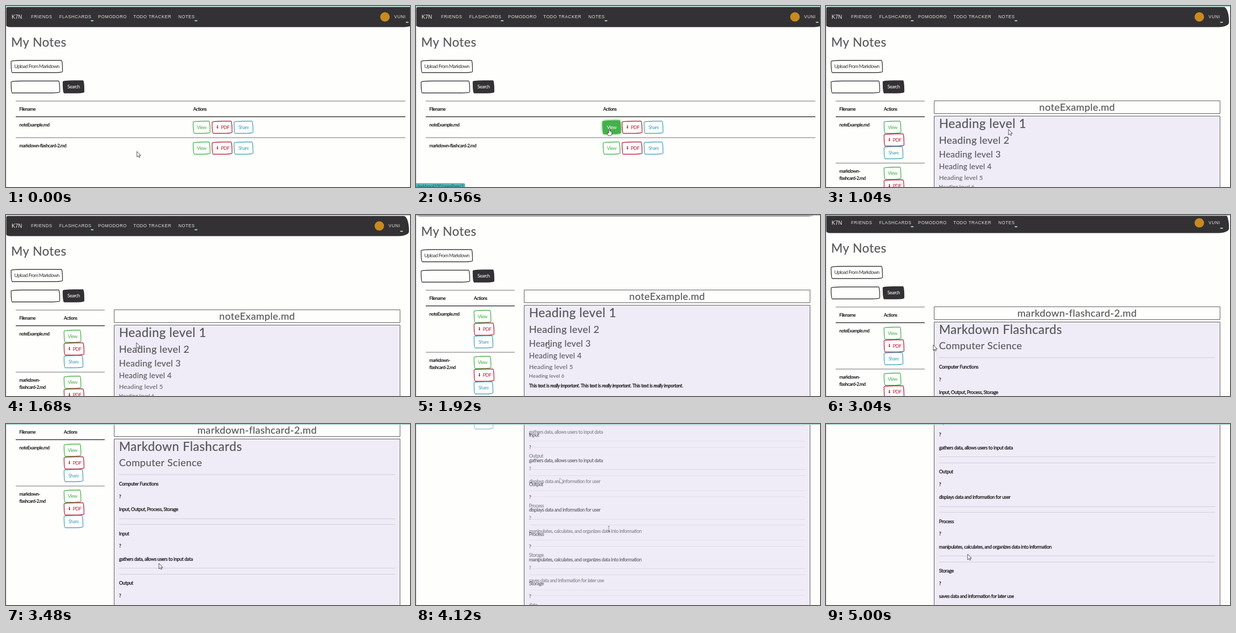
Write an HTML page with a canvas that moves like this. It is 790 px wide and 356 px high and loops after 5520 ms.

```html
<!DOCTYPE html>
<html lang="en">
<head>
<meta charset="utf-8">
<title>My Notes</title>
<style>
  html, body { margin: 0; width: 100%; height: 100%; overflow: hidden; background: #fefefd; }
  canvas { display: block; }
</style>
</head>
<body>
<canvas id="stage" width="790" height="356"></canvas>
<script>
const W = 790, H = 356, LOOP = 5520, STEP = 40, LAST = 5000;
const INK = '#1a1a1a', DARK = '#333133', GREEN = '#45b04b', RED = '#b5203c', BLUE = '#45a3b8', TEAL = '#a9d3d1';
const stage = document.getElementById('stage').getContext('2d');
const layer = document.createElement('canvas');
layer.width = W;
layer.height = H;
const ctx = layer.getContext('2d');

// Keys are [time, ...values]; two keys at one time make a jump.
const SCROLL = [[0, 0], [1760, 0], [2120, 94], [2700, 94], [2700, 0], [3000, 0], [3360, 187],
  [3560, 187], [4120, 381], [4160, 437], [4440, 455], [4960, 406]];
const POINTER = [[0, 256, 286], [440, 378, 241], [840, 378, 241], [1600, 255, 251], [2080, 255, 251],
  [2440, 135, 240], [2720, 135, 240], [3400, 299, 274], [3560, 299, 274], [4120, 377, 206],
  [4160, 281, 106], [4960, 277, 256]];

const CARDS = [
  ['Computer Functions', 'Input, Output, Process, Storage'],
  ['Input', 'gathers data, allows users to input data'],
  ['Output', 'displays data and information for user'],
  ['Process', 'manipulates, calculates, and organizes data into information'],
  ['Storage', 'saves data and information for later use'],
  ['data', '']
];

function track(keys, t) {
  const i = keys.findLastIndex(k => k[0] <= t);
  const a = keys[i], b = keys[i + 1];
  if (!b) return a.slice(1);
  const p = (t - a[0]) / (b[0] - a[0]), e = p * p * (3 - 2 * p);
  return a.slice(1).map((v, n) => v + (b[n + 1] - v) * e);
}

function stateAt(t) {
  const [scroll] = track(SCROLL, t), [x, y] = track(POINTER, t);
  return { scroll, x, y, note: t < 840 ? 0 : t < 2700 ? 1 : 2, overText: t >= 4000 && t < 4160 };
}

// y is the middle of the capitals; weight thickens the strokes.
function text(s, x, y, { size = 9.5, color = INK, style = '', family = 'Lato', gap = -0.45, align = 'left', weight = 0 } = {}) {
  ctx.font = `${style} ${size}px ${family}, sans-serif`;
  ctx.letterSpacing = gap + 'px';
  ctx.textAlign = align;
  ctx.fillStyle = ctx.strokeStyle = color;
  ctx.fillText(s, x, y + size * 0.35);
  if (weight) {
    ctx.lineJoin = 'round';
    ctx.lineWidth = weight;
    ctx.strokeText(s, x, y + size * 0.35);
  }
  return ctx.measureText(s).width;
}

// Parts between asterisks are italic.
function rich(s, x, y) {
  s.split('*').forEach((part, i) => x += text(part, x, y, { style: i % 2 ? 'italic' : '', weight: 0.3 }));
}

function heading(s, x, y, size, align = 'left') {
  text(s, x, y, { size, align, gap: size * 0.02, color: size > 14 ? '#58585b' : '#626265', weight: size * 0.01 });
}

function line(x1, x2, y, color = DARK, width = 1) {
  ctx.fillStyle = color;
  ctx.fillRect(x1, y, x2 - x1, width);
}

function sketchBox(x, y, w, h, color, fill) {
  ctx.beginPath();
  ctx.roundRect(x, y, w, h, [{ x: 155, y: 15 }, { x: 15, y: 137 }, { x: 137, y: 15 }, { x: 15, y: 155 }]);
  if (fill) {
    ctx.fillStyle = fill;
    ctx.fill();
  }
  ctx.strokeStyle = color;
  ctx.lineWidth = 1.3;
  ctx.stroke();
}

function button(label, x, y, w, color, solid) {
  sketchBox(x, y, w, 24, color, solid && color);
  text(label, x + w / 2, y + 12, { color: solid ? '#fff' : color, align: 'center', gap: -0.65 });
}

function caret(x, y) {
  ctx.fillStyle = '#8fd0c2';
  ctx.beginPath();
  ctx.ellipse(x, y, 3, 1.2, 0, 0, 7);
  ctx.fill();
}

function navBar(wide) {
  const nav = (s, x) => text(s, x, 21.5, { size: 8.5, gap: 0.6, color: '#e4e4e4', family: 'Liberation Sans' });
  const end = wide ? 799 : 788;
  ctx.fillStyle = DARK;
  ctx.beginPath();
  ctx.roundRect(0, 2, end, 39.5, [{ x: 4, y: 4 }, { x: 10, y: 28 }, { x: 20, y: 9 }, { x: 8, y: 4 }]);
  ctx.fill();
  text('K7N', 11, 21.5, { size: 10.5, gap: 0, color: '#f4f4f4', family: 'Liberation Sans' });
  nav('FRIENDS', 49);
  nav('FLASHCARDS', 104);
  nav('POMODORO', 180);
  nav('TODO TRACKER', 249);
  nav('NOTES', 337);
  nav('VUNI', end - 40);
  caret(168.5, 29);
  caret(371.5, 29);
  caret(end - 14.5, 32);
  ctx.fillStyle = '#c88a20';
  ctx.beginPath();
  ctx.arc(end - 58, 21.5, 9.3, 0, 7);
  ctx.fill();
}

function viewBoxes(note) {
  return note ? [[113.5, 226.5], [113.5, 317]] : [[366, 226.5], [366, 267.5]];
}

function actions([x, y], stacked, hovered) {
  if (hovered) {
    ctx.save();
    ctx.shadowColor = '#4fc455';
    ctx.shadowBlur = 4;
    sketchBox(x - 1, y - 1, 35, 26, GREEN, GREEN);
    ctx.restore();
  }
  const place = i => stacked ? [x, y + 25 * i] : [x + [0, 37, 80][i], y];
  button('View', ...place(0), 33, GREEN, hovered);
  const [px, py] = place(1);
  button('', px, py, 39, RED);
  text('PDF', px + 17, py + 12, { color: RED });
  ctx.fillStyle = RED;
  ctx.fillRect(px + 9.7, py + 8, 1.6, 4);
  ctx.beginPath();
  ctx.moveTo(px + 8.5, py + 12);
  ctx.lineTo(px + 12.5, py + 12);
  ctx.lineTo(px + 10.5, py + 15);
  ctx.fill();
  button('Share', ...place(2), 37, BLUE);
}

function table(note, hover) {
  const end = note ? 193 : 781, bold = { style: 'bold', size: 9, gap: -0.6 };
  text('Filename', 26, 202.5, bold);
  text('Actions', note ? 113 : 366, 202.5, bold);
  line(19, end, 186.5, '#666');
  line(19, end, 217, DARK, 1.5);
  line(19, end, note ? 308.5 : 258.5, '#666');
  text('noteExample.md', 26, 234, bold);
  if (note) {
    text('markdown-', 26, 324.5, bold);
    text('flashcard-2.md', 26, 339, bold);
  } else {
    text('markdown-flashcard-2.md', 26, 274.5, bold);
  }
  viewBoxes(note).forEach((box, i) => actions(box, note > 0, hover === i));
}

function firstNote() {
  [[231.5, 24.2], [264, 19.5], [292, 17.1], [316, 14.6], [338, 12.2], [356, 9.8]]
    .forEach(([y, size], i) => heading('Heading level ' + (i + 1), 221, y, size));
  rich('This text is *really important*. '.repeat(3).trim(), 221, 375);
  heading('The quarterly results look great!', 221, 401, 14.6);
  rich('•  Revenue was off the chart.', 238, 423);
  rich('•  Profits were higher than ever. *Everything* is going according to plan.', 238, 438);
}

function secondNote() {
  const rule = y => line(221, 761, y, '#cfccd8');
  heading('Markdown Flashcards', 221, 231.5, 24.2);
  heading('Computer Science', 221, 263.5, 19.5);
  rule(286);
  CARDS.forEach(([term, answer], i) => {
    const y = 305 + 97.5 * i;
    rich(term, 221, y);
    rich('?', 221, y + 24.5);
    rich(answer, 221, y + 50);
    rule(Math.round(y + 67.5));
    rule(Math.round(y + 79));
  });
}

function notePanel(note) {
  ctx.strokeStyle = '#555';
  ctx.lineWidth = 1;
  ctx.strokeRect(211.5, 186.5, 559, 25);
  ctx.fillStyle = '#efecf8';
  ctx.fillRect(211.5, 216.5, 559, 900);
  ctx.strokeRect(211.5, 216.5, 559, 900);
  heading(note === 1 ? 'noteExample.md' : 'markdown-flashcard-2.md', 491, 199, 19.5, 'center');
  note === 1 ? firstNote() : secondNote();
}

function pointer(x, y, kind) {
  const shapes = {
    arrow: 'M0 0V11L2.6 8.6 4.3 12 6 11.2 4.4 8H7.6Z',
    hand: 'M-1 1Q0-1 1 1V5Q5 5 5 7V10Q4 14 3 14H-2L-4 9Q-4 7-1 9Z',
    beam: 'M-2-5H2M0-5V5M-2 5H2'
  };
  const path = new Path2D(shapes[kind]);
  ctx.save();
  ctx.translate(x, y);
  ctx.fillStyle = '#fff';
  ctx.strokeStyle = '#333';
  ctx.lineWidth = 0.9;
  if (kind !== 'beam') ctx.fill(path);
  ctx.stroke(path);
  ctx.restore();
}

function drawScene({ scroll, x, y, note, overText }) {
  const hover = viewBoxes(note).findIndex(([bx, by]) =>
    x >= bx && x <= bx + 33 && y + scroll >= by && y + scroll <= by + 24);
  ctx.fillStyle = '#fefefd';
  ctx.fillRect(0, 0, W, H);
  ctx.save();
  ctx.translate(0, -Math.round(scroll));
  navBar(note === 0);
  heading('My Notes', 10, 71.5, 24.2);
  button('Upload From Markdown', 10, 107, 100.5, DARK);
  sketchBox(10, 147.5, 95, 23.5, DARK);
  button('Search', 111.5, 147, 41, DARK, true);
  table(note, hover);
  if (note) notePanel(note);
  ctx.restore();
  line(0, W, 0, TEAL, 1.6);
  ctx.fillStyle = '#c9cccc';
  ctx.fillRect(0, 2, 0.7, H);
  if (hover >= 0) {
    ctx.fillStyle = '#55b5b3';
    ctx.beginPath();
    ctx.roundRect(-2, 348.5, 98, 20, 3);
    ctx.fill();
    text('deskbox:4100/openPage/' + (hover + 1), 2, 355.5, { size: 8.5, color: '#1f5c60' });
  }
  pointer(x, y, hover >= 0 ? 'hand' : overText ? 'beam' : 'arrow');
}

function show(state, alpha) {
  drawScene(state);
  stage.globalAlpha = alpha;
  stage.drawImage(layer, 0, 0);
}

function frame() {
  const t = Math.min(LAST, Math.floor(performance.now() % LOOP / STEP) * STEP);
  const now = stateAt(t), next = stateAt(t + STEP);
  show(now, 1);
  // Fast scrolling blends into the next picture.
  if (Math.abs(next.scroll - now.scroll) > 30) show(next, 0.42);
  requestAnimationFrame(frame);
}
frame();
</script>
</body>
</html>
```
